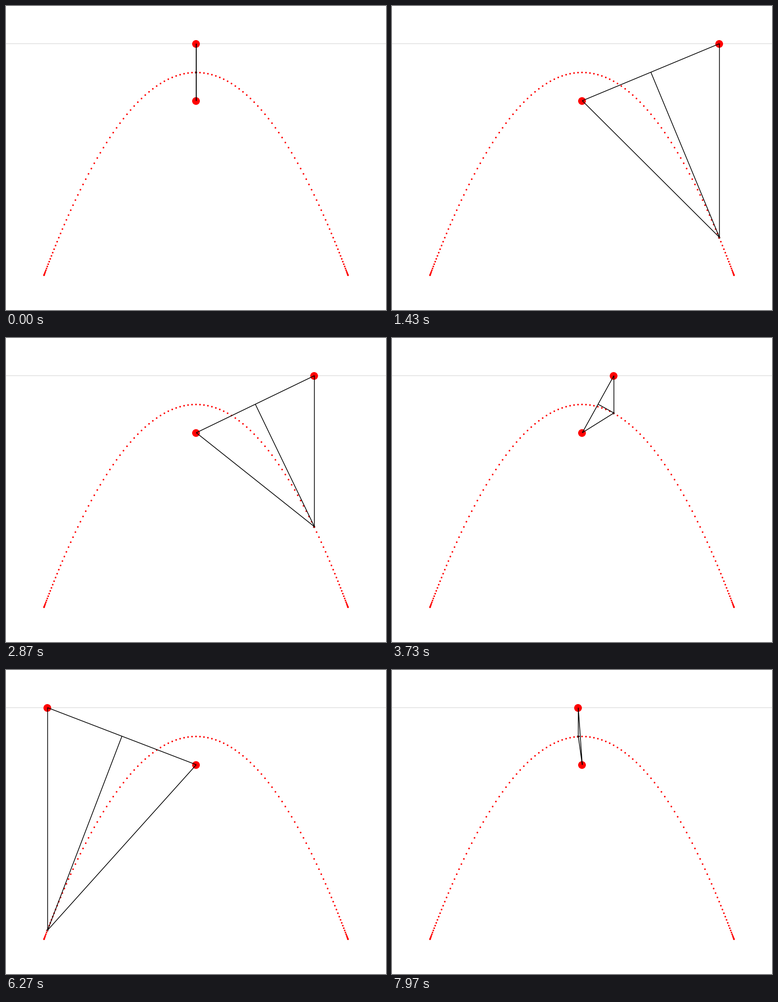
Animation of 837x669 px, one loop 8.01 s. Source, as a matplotlib script:

```python
import numpy as np
import matplotlib.pyplot as plt
from matplotlib.animation import FuncAnimation
from matplotlib.collections import PatchCollection
from matplotlib.patches import Circle

W, H, DPI = 837, 669, 64
LOOP_MS, TICK_MS = 8010, 15
STEPS = 240  # poses per loop, 30 per second
CX = W / 2
DIRECTRIX, FOCUS = 83.5, 209.1
P = FOCUS - DIRECTRIX
VERTEX = (DIRECTRIX + FOCUS) / 2
SWING = 0.4 * W
SHIFT = np.array([0.6, -0.6])  # lines sit slightly off the dots
RED = "#ff0000"

plt.rcParams["path.snap"] = False


def px(width):
    return width * 72 / DPI


def curve(step):
    """Point of the parabola at a step of the loop."""
    d = SWING * np.sin(2 * np.pi * step / STEPS)
    return CX + d, VERTEX + d * d / (2 * P)


def step_at(ms):
    """Step on show at a time; steps begin on whole hundredths of a second."""
    return min((3 * ms + 10) // 100, STEPS - 1)


fig = plt.figure(figsize=(W / DPI, H / DPI), dpi=DPI, facecolor="white")
ax = fig.add_axes([0, 0, 1, 1])
ax.set_xlim(0, W)
ax.set_ylim(H, 0)
ax.axis("off")


def disc(xy, r, color, z):
    return ax.add_patch(Circle(xy, r, facecolor=color, linewidth=0, zorder=z))


def stroke():
    return ax.plot([], [], color="black", lw=px(1.6), zorder=5,
                   solid_capstyle="butt", solid_joinstyle="miter")[0]


ax.plot([0, W], [82.9, 82.9], color="#d9d9d9", lw=px(1.3), zorder=1)
disc((CX, FOCUS), 8.5, RED, 2)
slider = disc((CX, DIRECTRIX), 8.5, RED, 2)
tracer = disc((CX, VERTEX), 2.4, "black", 3)
trail = [Circle(curve(i), 1.8) for i in range(-STEPS // 4, STEPS // 4 + 1)]
ax.add_collection(PatchCollection(trail, facecolor=RED, linewidth=0, zorder=4))
triangle, tangent = stroke(), stroke()


def update(i):
    # each tick shows the last step that begins within it
    x, y = curve(step_at(i * TICK_MS + 10))
    slider.center = x, DIRECTRIX
    tracer.center = x, y
    focus, foot, point = np.array([(CX, FOCUS), (x, DIRECTRIX), (x, y)]) + SHIFT
    triangle.set_data(*np.array([focus, foot, point, focus]).T)
    tangent.set_data(*np.array([(focus + foot) / 2, point]).T)
    return slider, tracer, triangle, tangent


anim = FuncAnimation(fig, update, frames=LOOP_MS // TICK_MS, interval=TICK_MS,
                     repeat=True, repeat_delay=0, blit=False)
plt.show()
```
